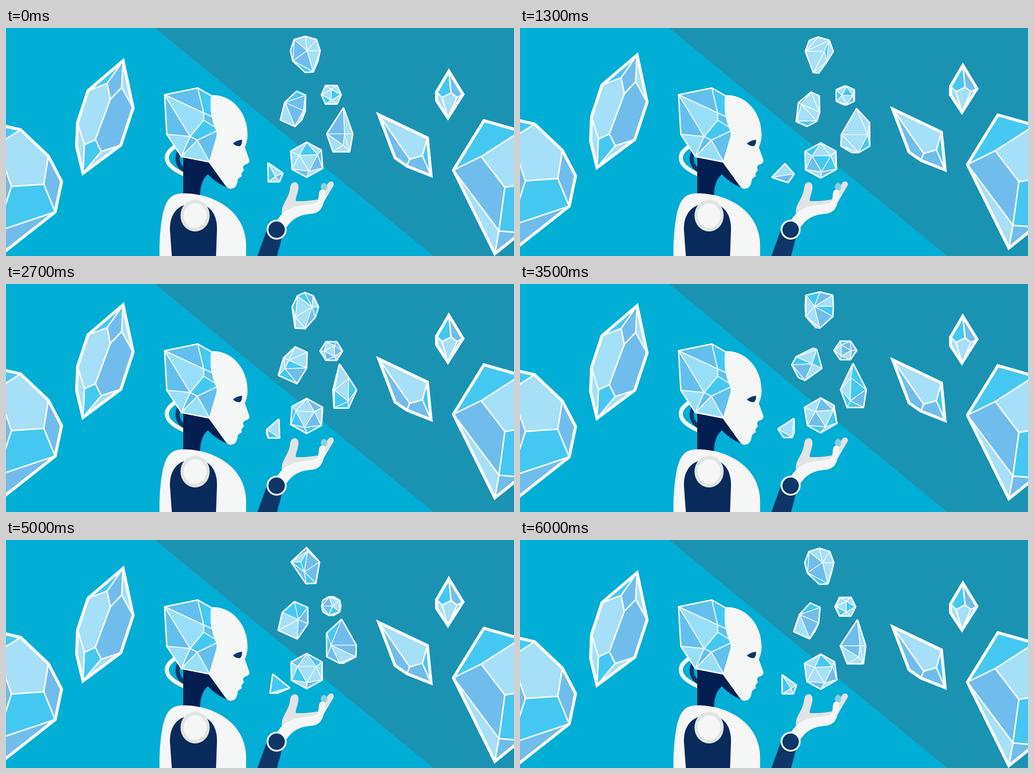
Recreate the animation shown at these times as an HTML page. Size 1115x502 px, loop 6100 ms.

```html
<!DOCTYPE html>
<html lang="en">
<head>
<meta charset="utf-8">
<title>Robot and crystals</title>
<style>
  html, body { margin: 0; width: 100%; height: 100%; overflow: hidden; background: #00aed6; }
  svg { display: block; width: 100%; height: 100%; }
</style>
</head>
<body>
<svg viewBox="0 0 1115 502">
  <rect width="1115" height="502" fill="#00aed6"/>
  <path d="M327 0H1115V502H938Z" fill="#1a93b3"/>

  <g id="rocks"></g>

  <!-- cables and neck -->
  <path d="M371 261C343 279 346 303 391 322" fill="none" stroke="#f5f7f7" stroke-width="9"/>
  <path d="M383 268C372 284 376 304 391 313" fill="none" stroke="#0c3768" stroke-width="9"/>
  <path d="M389 278L448 292 498 354C478 351 458 338 443 322Q425 338 426 372H389Z" fill="#001f50"/>

  <g id="skull"></g>

  <!-- mask -->
  <path d="M450 148C494 145 531 185 530 236Q530 252 524 262L534 290Q536 298 524 301L520 306 522 314 517 319V327Q508 330 508 339Q505 354 492 354Q486 353 481 346L445 296Q463 262 462 229C450 198 447 182 450 148Z" fill="#f5f7f7"/>
  <path d="M498 254Q507 247 518 246Q519 255 514 260Q504 261 498 254Z" fill="#0c3768"/>

  <!-- torso -->
  <path d="M337 502C336 465 340 425 346 402C353 376 364 364 390 364C452 364 527 400 527 480V502Z" fill="#f5f7f7"/>
  <path d="M364 502L360 447C358 412 376 388 405 388H425C452 390 465 418 463 447L461 502Z" fill="#082b5c"/>
  <ellipse cx="415" cy="413" rx="32" ry="35" fill="#e2e3e3"/>
  <ellipse cx="415" cy="413" rx="25" ry="27" fill="#f5f7f7"/>

  <!-- arm and hand -->
  <path d="M572 446L552 502H595L607 456Z" fill="#0c3768"/>
  <path d="M606 412C602 387 621 379 624 350C626 336 642 336 642 350C642 363 635 372 636 381Q662 382 687 377L706 343C711 334 722 337 719 347L692 392 630 405Z" fill="#e2e3e3"/>
  <ellipse cx="698" cy="350" rx="7" ry="9" fill="#8fcbe8"/>
  <path d="M593 426C601 414 609 403 625 397C648 386 676 392 685 381L687 363C689 353 701 354 701 363L700 372 711 358 697 384C694 398 686 408 670 409C643 411 627 421 615 440Z" fill="#f5f7f7"/>
  <circle cx="594" cy="444" r="22" fill="#f5f7f7"/>
  <circle cx="594" cy="444" r="18" fill="#0c3768"/>

  <g id="gems"></g>
</svg>
<script>
const LOOP = 6100, STEP = 100, TURN = 2 * Math.PI;
const tint = { L: '#a5dff8', M: '#70bded', B: '#44c8f2' };
const skullTint = { L: '#97dff9', M: '#62bfee', B: '#44c8f2' };
const layer = id => document.getElementById(id);
const rad = deg => deg * TURN / 360;

function addPath(parent, fill, width, d = '', join = 'round') {
  const el = document.createElementNS('http://www.w3.org/2000/svg', 'path');
  const attrs = { d, fill, stroke: '#fff', 'stroke-width': width, 'stroke-linejoin': join };
  for (const key in attrs) el.setAttribute(key, attrs[key]);
  parent.append(el);
  return el;
}

// A flat crystal: corners are lettered a, b, c...; a face is its colour and its letters
function facets(parent, corners, rim, faces, colours, rimWidth, lineWidth) {
  const at = corners.split(' ');
  const shape = letters => 'M' + [...letters].map(ch => at[ch.charCodeAt(0) - 97]).join('L') + 'Z';
  for (const [colour, ...letters] of faces.split(' '))
    addPath(parent, colours[colour], lineWidth, shape(letters));
  addPath(parent, 'none', rimWidth, shape(rim), 'miter');
}

const rock = (...parts) => facets(layer('rocks'), ...parts, tint, 6.5, 3);
rock('-20,212 32,224 93,282 122,338 108,405 -20,506 12,349 83,344 -20,257 -20,448',
  'abcdef', 'Mibgj Lbchgi Babi Bghej Mcdeh Mjef');
rock('257,72 279,176 252,258 169,320 155,261 157,208 180,138 222,122 229,157 254,131 196,246 209,272 172,257',
  'abcdefg', 'Lghikmf Bgha Mhija Lajb Mjbclki Bkldm Lfmde Llcd');
rock('972,95 1003,146 970,198 945,160 945,141 977,143 990,153 957,153',
  'abcde', 'Bafhe Mabgf Lfgch Lehcd Mgbc');
rock('818,191 925,242 933,325 880,304 854,286 914,281 886,289',
  'abcde', 'Labfg Magde Mgfcd Bbcf');
rock('982,313 1049,204 1130,227 1130,451 1073,497 1043,283 1095,351 1082,447 1130,345',
  'abcde', 'Babcf Lfcig Mafgh Lahe Bgidh Mhde');

facets(layer('skull'), '348,147 421,132 452,150 462,200 468,224 447,295 385,283 353,234 434,187 434,203 404,239 420,247',
  'abcdefgh', 'Maib Bbcdi Mideji Bjelk Laijk Makh Lhkg Mklg Lglf Mlef', skullTint, 3, 2);

// Corners of a spinning gem: rings of n corners around the upright axis
const ring = (y, r, n = 1, turn = 0) => Array.from({ length: n }, (_, i) => {
  const a = rad(turn) + i * TURN / n;
  return [r * Math.sin(a), y, r * Math.cos(a)];
});

function upright(r, turn) {
  const w = r * 2 / Math.sqrt(5);
  return [ring(-r, 0), ring(-w / 2, w, 5, turn), ring(w / 2, w, 5, turn + 36), ring(r, 0)];
}

function sideways(s) {
  const g = s * (1 + Math.sqrt(5)) / 2;
  const sides = [1, -1].map(k => [...ring(k * g, s, 2, 90), ...ring(k * s, g, 2), ...ring(0, s * 2, 2, 90 + k * 31)]);
  return sides;
}

const gems = [
  { x: 657, y: 58, rings: [ring(-39, 3), ring(-32, 29, 2, 124), ring(-8, 32, 4, 7), ring(14, 29, 2, 111), ring(38, 24, 1, 45), ring(39, 2)] },
  { x: 632, y: 179, lean: 24, rings: [ring(-38, 16, 2, 40), ring(-6, 31, 4, 40), ring(14, 33, 1, 132), ring(33, 24, 2, 45)] },
  { x: 714, y: 147, rings: sideways(12.2) },
  { x: 736, y: 230, rings: [ring(-53, 5, 1, 110), ring(-23, 33, 1, 189), ring(3, 33, 3, 12), ring(28, 33, 2, 7), ring(42, 18, 2, 101)] },
  { x: 660, y: 290, tilt: 14, rings: upright(39, 44) },
  { x: 588, y: 320, rings: [ring(-22, 13, 1, -74), ring(7, 36, 1, 5), ring(0, 21, 1, 115), ring(18, 12, 2, 75)] }
];

const sub = (a, b) => a.map((v, i) => v - b[i]);
const dot = (a, b) => a.reduce((sum, v, i) => sum + v * b[i], 0);
const cross = (a, b) => [a[1] * b[2] - a[2] * b[1], a[2] * b[0] - a[0] * b[2], a[0] * b[1] - a[1] * b[0]];

// Outward-facing triangles of the convex hull
function hull(pts) {
  const faces = [], n = pts.length;
  for (let i = 0; i < n; i++) for (let j = i + 1; j < n; j++) for (let k = j + 1; k < n; k++) {
    const normal = cross(sub(pts[j], pts[i]), sub(pts[k], pts[i]));
    const sides = pts.map(p => dot(normal, sub(p, pts[i])));
    if (sides.every(s => s < 1e-6)) faces.push([i, j, k]);
    else if (sides.every(s => s > -1e-6)) faces.push([i, k, j]);
  }
  return faces;
}

const shades = ['L', 'B', 'L', 'M'];
for (const gem of gems) {
  gem.pts = gem.rings.flat();
  gem.faces = hull(gem.pts);
  gem.base = addPath(layer('gems'), '#fff', 4.6);
  gem.fills = shades.map(s => addPath(layer('gems'), tint[s], 1.6));
}

function drawGem({ x, y, lean = 0, tilt = 0, pts, faces, base, fills }, angle) {
  const spin = (a, b, t) => [a * Math.cos(t) - b * Math.sin(t), a * Math.sin(t) + b * Math.cos(t)];
  const bob = 1.6 * Math.sin(angle);
  const flat = pts.map(([px, py, pz]) => {
    const [u, depth] = spin(px, pz, angle);
    const [, v] = spin(depth, py, rad(tilt));
    const [sx, sy] = spin(u, v, rad(lean));
    return [x + sx, y + bob + sy];
  });
  const parts = shades.map(() => '');
  faces.forEach((face, n) => {
    const [p, q, r] = face.map(i => flat[i]);
    const area = (q[0] - p[0]) * (r[1] - p[1]) - (q[1] - p[1]) * (r[0] - p[0]);
    if (area > 0) parts[n % shades.length] += `M${p}L${q}L${r}Z`;
  });
  base.setAttribute('d', parts.join(''));
  fills.forEach((el, i) => el.setAttribute('d', parts[i]));
}

function draw(now) {
  const t = Math.floor((now % LOOP) / STEP) * STEP;
  const rise = Math.max(0, Math.min(t, 6000 - t)) * .00967;
  layer('rocks').setAttribute('transform', `translate(0 ${-rise})`);
  for (const gem of gems) drawGem(gem, t / LOOP * TURN);
}

const start = performance.now();
function tick() {
  draw(performance.now() - start);
  requestAnimationFrame(tick);
}
tick();
</script>
</body>
</html>
```
